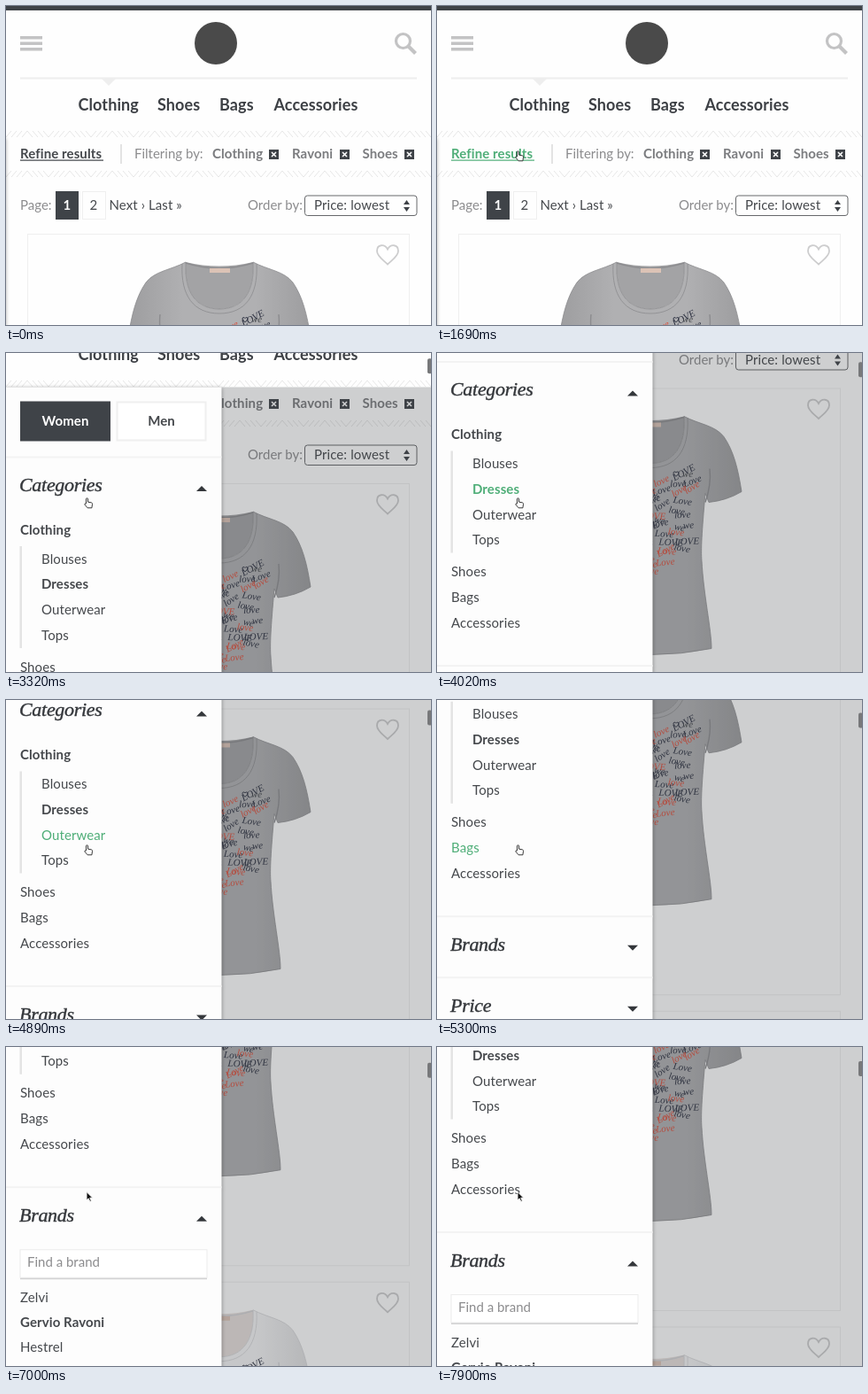
These frames come from a looping animation (480 by 360 pixels, 8 s). An HTML page:

```html
<!DOCTYPE html>
<html lang="en">
<head>
<meta charset="utf-8">
<title>Shop filter panel</title>
<style>
  html, body { margin: 0; width: 100%; height: 100%; overflow: hidden; background: #fefefe; }
  svg { display: block; }
  text { font: 15px Lato, "Open Sans", sans-serif; letter-spacing: .1px; fill: #45484c; }
  .b { font-weight: 700; }
  .nav { font-size: 18px; font-weight: 700; fill: #3d4045; }
  .grey { fill: #8c8c8e; letter-spacing: 0; }
  .tag { font-weight: 700; fill: #7b7c7f; }
  .white { font-weight: 700; fill: #fff; }
  .mid { text-anchor: middle; }
  .head { font: italic 22px "Liberation Serif", "Noto Serif", serif; letter-spacing: -.3px;
          fill: #34373b; stroke: #34373b; stroke-width: .4px; }
  .print { font: italic 11px "Liberation Serif", serif; letter-spacing: 0; }
  .on { fill: #4fae78; }
  #panel { filter: drop-shadow(0 1px 2px rgba(0, 0, 0, .4)); }
</style>
</head>
<body>
<svg id="stage" width="480" height="360" viewBox="0 0 480 360"></svg>
<script>
const DARK = '#3f4348', LOOP = 8000;

const text = (x, y, s, cls = '', id = '') => `<text x="${x}" y="${y}" class="${cls}" id="${id}">${s}</text>`;
const rect = (x, y, w, h, fill, more = '') =>
  `<rect x="${x}" y="${y}" width="${w}" height="${h}" fill="${fill}" ${more}/>`;
const path = (d, fill, more = '') => `<path d="${d}" fill="${fill}" ${more}/>`;
const move = (x, y, s, more = '') => `<g transform="translate(${x} ${y})" ${more}>${s}</g>`;

// Page parts
const hatch = y => move(0, y, rect(0, 0, 480, 7, 'url(#hatch)'));
const closeBox = x => rect(x, 162, 11, 11, DARK) +
  path(`M${x + 3} 165l5 5m0-5l-5 5`, 'none', 'stroke="#fff" stroke-width="1.6"');
const HEART = 'M0 11C-5 6-12 2-12-4C-12-12-3-12 0-6C3-12 12-12 12-4C12 2 5 6 0 11Z';

// Handwritten words filling a heart whose left lobe hangs lower
function lettering() {
  let seed = 7, out = '';
  const rnd = () => (seed = seed * 16807 % 2147483647) / 2147483647;
  const words = ['love', 'Love', 'LOVE', 'we', 'love'];
  for (let y = 358; y < 484; y += 9)
    for (let x = 188; x < 296; x += 18) {
      const px = x + rnd() * 9, py = y + rnd() * 5, turn = rnd() * 50 - 35;
      const word = words[Math.floor(rnd() * 5)], red = rnd() < .33;
      const u = (px + 7 - 241) / 45, v = (419 - py) / 60;
      if ((u * u + v * v - 1) ** 3 - u * u * v ** 3 > 0 || py + px / 2 < 490) continue;
      out += `<text class="print" style="fill:${red ? '#dd4f3c' : '#2c3040'}"
        transform="translate(${px} ${py}) rotate(${turn})">${word}</text>`;
    }
  return out + path(HEART, 'none', 'transform="translate(270 354) scale(.25)" stroke="#2c3040" stroke-width="4"') +
    text(277, 357, 'we', 'print');
}

const FRONT_NECK = 'C281 322 268 342 241 342C214 342 201 322 203 289Z';
const SHIRT = 'M203 289C186 298 168 299 158 312C147 328 142 348 138 374Q155 384 175 386L179 376' +
  'C183 420 184 440 183 452C181 490 172 530 172 551Q241 565 310 551C310 530 301 490 299 452' +
  'C298 440 299 420 303 376L307 386Q327 384 344 374C340 348 335 328 324 312C314 299 296 298 279 289' + FRONT_NECK;
const shirt = (fill, inner, edge) =>
  path('M203 289Q241 298 279 289' + FRONT_NECK, inner) +
  path(SHIRT, `url(#${fill})`, `stroke="${edge}" stroke-width=".8"`) +
  path('M199 291C197 327 212 347 241 347C270 347 285 327 283 291', 'none', `stroke="${edge}" stroke-width=".8"`) +
  path('M203 290Q241 302 279 290M174 348Q172 366 179 386M308 348Q310 366 303 386',
    'none', `stroke="${edge}" stroke-width="1.4"`) +
  rect(230, 296, 23, 5, '#dcc3b6') + lettering();
const card = (y, item) => move(0, y, rect(24.5, 257.5, 431, 401.5, '#fefefe', 'stroke="#efefef"') + item +
  move(431, 280.5, path(HEART, '#fff', 'stroke="#cdcdce" stroke-width="1.8"')));

const shade = (id, side, mid) => `<linearGradient id="${id}"><stop offset="0" stop-color="${side}"/>
  <stop offset=".3" stop-color="${mid}"/><stop offset=".7" stop-color="${mid}"/>
  <stop offset="1" stop-color="${side}"/></linearGradient>`;

const defs = `<defs>
  <pattern id="hatch" width="48" height="7" patternUnits="userSpaceOnUse">
    <path d="M0 7${'l6-7m0 7'.repeat(4)}${'m6 0l-6-7m6 7'.repeat(4)}" stroke="#e6e6e6" fill="none"/>
  </pattern>${shade('heather', '#9d9d9f', '#b0b0b2')}${shade('pale', '#dededf', '#f4f4f5')}</defs>`;

const header = rect(0, 0, 480, 5, '#3f4246') +
  [34, 40.5, 47].map(y => rect(16, y, 25, 3.5, '#c3c3c4')).join('') +
  '<circle cx="237" cy="42" r="24" fill="#4a4a4a"/>' +
  '<circle cx="448.5" cy="39.5" r="8" fill="none" stroke="#c3c3c4" stroke-width="3.2"/>' +
  path('M454.5 45.5l8 8', 'none', 'stroke="#c3c3c4" stroke-width="4.2"') +
  rect(16, 80.5, 448, 2, '#eee') + path('M108 82h16l-8 8z', '#eee') +
  text(81.5, 118.3, 'Clothing', 'nav') + text(171, 118.3, 'Shoes', 'nav') +
  text(241, 118.3, 'Bags', 'nav') + text(302.5, 118.3, 'Accessories', 'nav');

const filters = hatch(141) + hatch(186) +
  `<g id="refine" fill="${DARK}">` + text(16, 172, 'Refine results', 'b', 'refineText') +
  '<rect x="16" y="173.5" width="94" height="1.2"/></g>' +
  rect(129.5, 156, 1, 22, '#c8c8c8') + text(145, 172, 'Filtering by:', 'grey') +
  text(233, 172, 'Clothing', 'tag') + text(323, 172, 'Ravoni', 'tag') + text(402.5, 172, 'Shoes', 'tag') +
  closeBox(297) + closeBox(377) + closeBox(450);

const paging = text(16, 230, 'Page:', 'grey') + rect(56, 209, 26, 32, DARK) + text(69, 230, '1', 'white mid') +
  rect(86.5, 209.5, 26, 31, '#fefefe', 'stroke="#efefef"') + text(99, 230, '2', 'mid') +
  text(116.5, 230, 'Next › Last »') + text(273, 230, 'Order by:', 'grey') +
  rect(337.5, 214, 126.5, 22.5, '#fefefe', 'rx="3" stroke="#66686b"') +
  text(348, 230, 'Price: lowest') + path('M449 224h7l-3.5-5zm0 3h7l-3.5 5z', DARK);

// Side panel
const items = [[16, 314.5, 'Clothing', 'b'], [40, 347.5, 'Blouses'], [40, 376, 'Dresses', 'b'], [40, 405, 'Outerwear'],
  [40, 433.5, 'Tops'], [16, 469.5, 'Shoes'], [16, 498.5, 'Bags'], [16, 527, 'Accessories']];
const brands = ['Zelvi', 'Gervio Ravoni', 'Hestrel', 'Ilmaro', 'Jorvane', 'Kelisto', 'Lurenza'];
const UP = 'M215 266h12l-6-6z', DOWN = 'M215 603h12l-6 6z', UP_BRANDS = 'M215 609h12l-6-6z';
const rule = y => rect(0, y, 243.5, 2, '#f3f3f3');

const panel = '<rect id="back" y="148.5" width="243.5" fill="#fdfdfd"/>' +
  rect(16, 164.5, 102, 45, DARK) + text(67, 192, 'Women', 'white mid') +
  rect(125.5, 165.5, 100, 43, '#fff', 'stroke="#efefef" stroke-width="2"') + text(175.5, 192, 'Men', 'b mid') +
  rule(226.5) + text(15, 265.5, 'Categories', 'head') + path(UP, '#34373b') +
  rect(15.5, 328, 2.5, 115, '#e4e4e4') +
  items.map(([x, y, s, cls], i) => text(x, y, s, cls, 'item' + i)).join('') +
  rule(569.5) + text(15, 609.5, 'Brands', 'head') + path(DOWN, '#34373b', 'id="toggle"') +
  '<svg id="list" y="639.5" width="243.5" height="0">' +
    rect(16, 3, 211, 32, '#d2d2d3') + rect(16, 1.5, 211, 31.5, '#fff', 'stroke="#ececec"') +
    text(24, 21, 'Find a brand', 'grey') +
    brands.map((s, i) => text(16, 61 + i * 28, s, i === 1 ? 'b' : '')).join('') + '</svg>' +
  '<g id="rest">' + ['Price', 'Discount'].map((s, i) => move(0, 69 * (i + 1),
    rule(569.5) + text(15, 609.5, s, 'head') + path(DOWN, '#34373b'))).join('') + '</g>';

const HAND = 'M2 6.4V1.3a1 1 0 0 1 2 0V4.6l4 .8q1.2.4 1 1.7l-.6 4.2H3.6L.4 7.6q-.3-1.3 1-1.2z';
const ARROW = 'M0 0V9.4L2.2 7.4 3.8 11 5.4 10.3 3.8 6.8H6.8z';

stage.innerHTML = defs + '<g id="page">' + header + filters + paging +
  card(0, shirt('heather', '#a3a3a5', '#8c8c8f')) + card(420, shirt('pale', '#e6dfdc', '#d2d2d5')) +
  '<rect id="veil" y="148.5" width="480" height="1000" fill="#3d4045"/>' +
  `<g id="panel">${panel}</g></g>` +
  rect(476, 0, 5, 17, '#77787a', 'id="thumb" rx="2"') +
  '<path id="cursor" stroke-width=".9" stroke-linejoin="round"/>';

const el = id => document.getElementById(id);
const set = (id, name, value) => el(id).setAttribute(name, value);

// Each leg is [start, end, step count, value reached]
function steps(t, value, legs) {
  for (const [t0, t1, n, to] of legs) {
    if (t < t0) break;
    const k = n > 1 ? Math.min(n, 1 + Math.floor((t - t0) / (t1 - t0) * (n - 1) + 1e-6)) : 1;
    value += (to - value) * k / n;
  }
  return value;
}

const SCROLL = [[2870, 2870, 1, 2.5], [2960, 3320, 4, 110], [3670, 4020, 4, 217.5], [4140, 4440, 4, 220],
  [4770, 4890, 2, 247.5], [5010, 5540, 6, 405], [5660, 5840, 3, 432.5], [6850, 7120, 4, 392],
  [7240, 7240, 1, 390], [7630, 7630, 1, 387], [7780, 7780, 1, 381], [7900, 7900, 1, 361.5]];
const MOUSE_X = [[940, 940, 1, 433], [990, 1050, 2, 253], [1290, 1690, 8, 91]];
const MOUSE_Y = [[940, 940, 1, 163], [990, 1050, 2, 208], [1290, 1690, 8, 163.5]];
const easeOut = p => p * (2 - p);

function draw(t) {
  const scroll = steps(t, 0, SCROLL);
  const open = easeOut(steps(t, 0, [[1920, 2540, 8, 1]]));
  const grow = 260 * easeOut(steps(t, 0, [[6320, 6760, 5, 1]]));
  const x = steps(t, 430, MOUSE_X), y = steps(t, 178, MOUSE_Y);

  set('page', 'transform', `translate(0 ${-scroll})`);
  set('panel', 'transform', `translate(${-244 * (1 - open)} 0)`);
  set('veil', 'opacity', .25 * open);
  set('back', 'height', 628 + grow);
  set('list', 'height', grow);
  set('rest', 'transform', `translate(0 ${grow})`);
  set('toggle', 'd', grow ? UP_BRANDS : DOWN);
  set('thumb', 'y', 2 + scroll * .0385);
  set('thumb', 'opacity', t < 2870 ? 0 : 1);

  set('refine', 'fill', x < 110 ? '#4fae78' : DARK);
  el('refineText').classList.toggle('on', x < 110);
  items.forEach(([, base], i) => el('item' + i).classList.toggle('on',
    t > 2870 && t < 6320 && Math.abs(y + scroll - base + 5) < 14.4));

  const hand = x === 433 || (x < 110 && t < 6850);
  set('cursor', 'd', hand ? HAND : ARROW);
  set('cursor', 'fill', hand ? '#fff' : '#111');
  set('cursor', 'stroke', hand ? '#222' : '#fff');
  set('cursor', 'transform', `translate(${x - (hand ? 2.5 : 0)} ${y})`);
  set('cursor', 'opacity', steps(t, 0, [[660, 720, 2, 1]]));
}

function tick() {
  draw(performance.now() % LOOP);
  requestAnimationFrame(tick);
}
tick();
</script>
</body>
</html>
```
